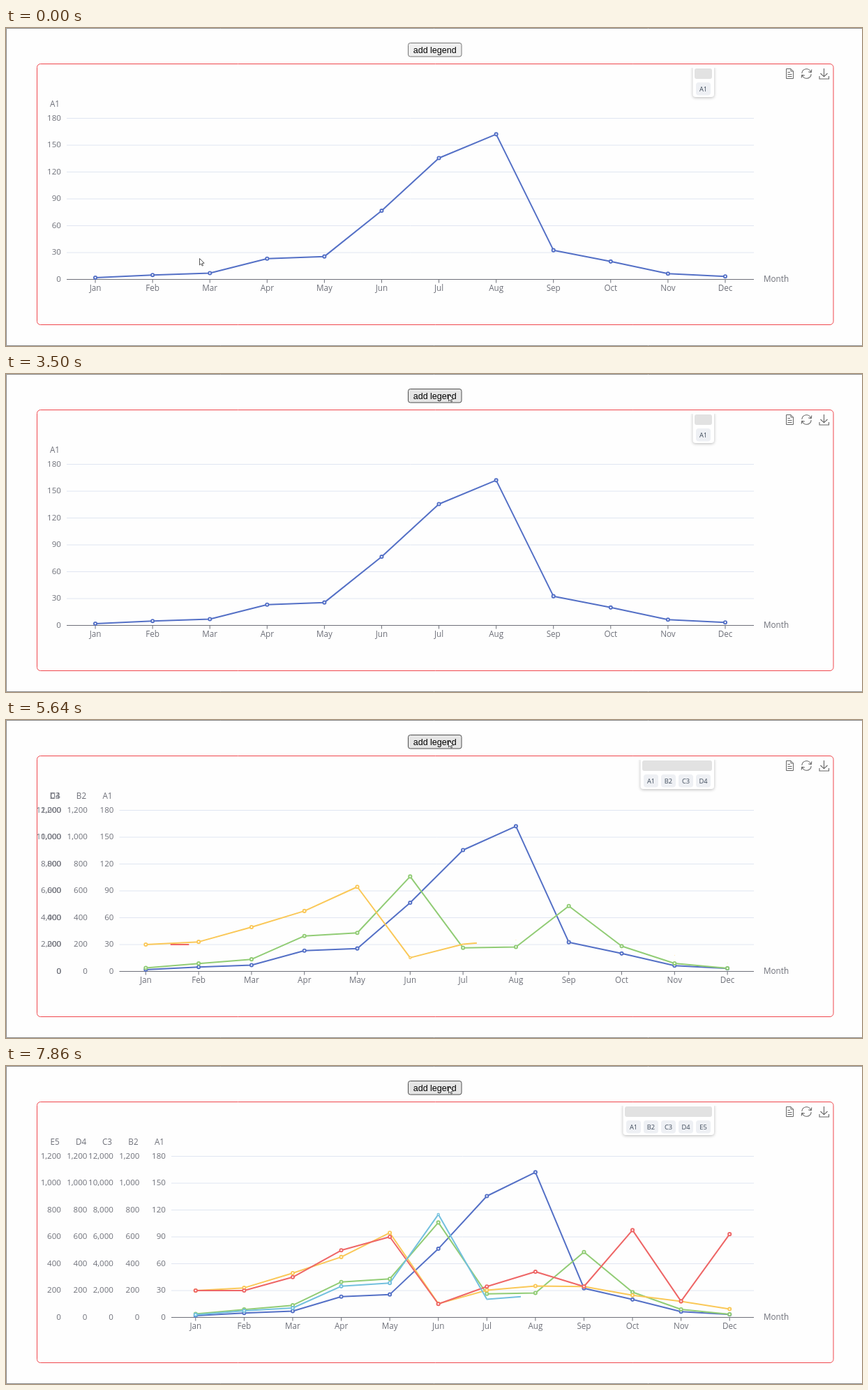
An HTML page with a canvas for the animation above (7990 ms loop, 1227 by 456 pixels).

```html
<!DOCTYPE html>
<html lang="en">
<head>
<meta charset="utf-8">
<title>Add legend</title>
<style>
  html, body { margin: 0; width: 100%; height: 100%; overflow: hidden; background: #fefefe; }
  canvas { display: block; }
</style>
</head>
<body>
<canvas id="stage" width="1227" height="456"></canvas>
<script>
const ctx = document.getElementById('stage').getContext('2d');
const LOOP = 7990, STEP = 132, RESPONSE = 60;
const REVEAL = 1000, MORPH = 500, DOT = 200;
const RIGHT = 1072, BASE = 360.5, HEIGHT = 231;
const GREY = '#6e7079', INK = '#666', FONT = '"Open Sans", "Noto Sans", sans-serif';
const MONTHS = 'Jan Feb Mar Apr May Jun Jul Aug Sep Oct Nov Dec'.split(' ');

const rain = [2, 4.9, 7, 23.2, 25.6, 76.7, 135.6, 162.2, 32.6, 20, 6.4, 3.3];
const series = [
  { name: 'A1', color: '#5470c6', max: 180, click: -5000, data: rain },
  { name: 'B2', color: '#91cc75', max: 1200, click: 3770,
    data: [26, 59, 90, 264, 287, 707, 175.6, 182.2, 487, 188, 60, 23] },
  { name: 'C3', color: '#fac858', max: 12000, click: 4970,
    data: [2, 2.2, 3.3, 4.5, 6.3, 1.02, 2.03, 2.34, 2.3, 1.65, 1.2, .62].map(v => v * 1000) },
  { name: 'D4', color: '#ee6666', max: 1200, click: 5500,
    data: [200, 200, 300, 500, 600, 100, 230, 340, 230, 650, 120, 620] },
  { name: 'E5', color: '#73c0de', max: 1200, click: 7200,
    data: rain.map(v => v > 100 ? v : v * 10) }
];

const pointerPath = [
  { at: 500, x: 277, y: 330 }, { at: 780, x: 351, y: 262 }, { at: 1310, x: 618, y: 309 },
  { at: 1580, x: 1147, y: 136 }, { at: 2420, x: 1147, y: 136 },
  { at: 2920, x: 709, y: 49 }, { at: 3420, x: 634, y: 29 }
];

const clamp = v => Math.min(1, Math.max(0, v));
const mix = (a, b, p) => a + (b - a) * p;
const cubicInOut = p => p < .5 ? 4 * p ** 3 : 1 - 4 * (1 - p) ** 3;
const gridLeft = count => 49.5 + 37.5 * count;
const slotX = (left, i) => left + (RIGHT - left) * (i + .5) / 12;
const startOf = k => k < series.length ? series[k].click + RESPONSE : Infinity;

function frameTime(t) {
  const from = Math.max(0, ...series.map(s => s.click).filter(click => click <= t));
  return from + Math.floor((t - from) / STEP) * STEP;
}

function pointerAt(t) {
  const i = pointerPath.findIndex(p => p.at > t);
  if (i < 1) return i ? pointerPath.at(-1) : pointerPath[0];
  const a = pointerPath[i - 1], b = pointerPath[i], p = (t - a.at) / (b.at - a.at);
  return { x: mix(a.x, b.x, p), y: mix(a.y, b.y, p) };
}

function text(str, x, y, size = 11.7, align = 'center', color = GREY, font = FONT) {
  ctx.font = `${size}px ${font}`;
  ctx.textAlign = align;
  ctx.fillStyle = color;
  ctx.fillText(str, x, y);
}

function paint(path, stroke, width = 1, fill) {
  if (fill) {
    ctx.fillStyle = fill;
    ctx.fill(path);
  }
  if (stroke) {
    ctx.strokeStyle = stroke;
    ctx.lineWidth = width;
    ctx.stroke(path);
  }
}

const shape = (d, ...style) => paint(new Path2D(d), ...style);

function box(x, y, w, h, r, fill, stroke) {
  const path = new Path2D();
  path.roundRect(x, y, w, h, r);
  paint(path, stroke, 1, fill);
}

function drawFrame() {
  ctx.fillStyle = '#fefefe';
  ctx.fillRect(0, 0, 1227, 456);
  shape('M1227 .5H.5V455.5H1227', '#8a8a8a');
  box(44.5, 51.5, 1141.5, 374, 5, null, '#f0474d');
}

function drawButton(t, pointer) {
  const pressed = series.some(s => s.click === t);
  const hover = !pressed && pointer.x < 653 && pointer.y < 41;
  const fill = pressed ? '#f5f5f5' : hover ? '#e5e5e5' : '#efefef';
  box(576.5, 21.5, 76.5, 19.5, 3, fill, hover ? '#4f4f4f' : '#767676');
  text('add legend', 614.7, 35.6, 12.5, 'center', '#000', '"Liberation Sans", Arial, sans-serif');
}

function drawTools() {
  shape('M1125 58.5H1118.5V72.5H1128.5V62L1125 58.5V62H1128.5', INK);
  shape('M1120.5 63.5H1124M1120.5 66.5H1126.5M1120.5 69.5H1126.5', INK);
  for (const turn of [0, Math.PI]) {
    ctx.save();
    ctx.translate(1147.5, 65.5);
    ctx.rotate(turn);
    shape('M-6.7 -.6A6.7 6.7 0 0 1 6.4 -2M7.3 -6L6.7 -1.8L2.8 -2.6', INK, 1.1);
    ctx.restore();
  }
  shape('M1172.5 58V69.5M1167.5 65L1172.5 69.8L1177.5 65M1166 69V73H1179.5V69', INK, 1.1);
}

function drawLegend(count) {
  const width = 25 * count, left = 1012 - width;
  ctx.save();
  ctx.beginPath();
  ctx.rect(left - 15, 57, width + 30, 55);
  ctx.clip();
  ctx.shadowColor = 'rgba(0,0,0,.28)';
  ctx.shadowBlur = 4;
  ctx.shadowOffsetY = 1;
  box(left - 2.5, 54, width + 5.5, 45, 4, '#fff');
  ctx.restore();
  box(left, 58, width, 15, 3, '#e2e2e2');
  for (let i = 0; i < count; i++) {
    const x = left + 12.5 + 25 * i;
    box(x - 10.5, 78, 21, 18.5, 4, '#eef0f4');
    text(series[i].name, x, 90.7, 9.3, 'center', '#3f4b5b');
  }
}

// The newest axis takes the outer place at once while older ones slide right.
function axisX(k, count, left) {
  return k && k === count - 1 ? gridLeft(1) : left - 37.5 * k;
}

function drawAxes(count, left) {
  for (let i = 1; i <= 6; i++) shape(`M${left} ${BASE - HEIGHT * i / 6}H${RIGHT}`, '#e0e6f1');
  for (let k = 0; k < count; k++) {
    const x = axisX(k, count, left), { name, max } = series[k];
    text(name, x - 17, 112.6);
    for (let i = 0; i <= 6; i++)
      text((max * i / 6).toLocaleString('en-US'), x - 8, BASE + 3.2 - HEIGHT * i / 6, 11.6, 'right');
  }
  shape(`M${left} ${BASE}H${RIGHT}`, GREY, 1.2);
  MONTHS.forEach((month, i) => {
    const x = slotX(left, i);
    shape(`M${x} ${BASE}v5`, GREY);
    text(month, x, 376.6);
  });
  text('Month', 1086, 363.6, 11.7, 'left');
}

// Adding another series restarts the remaining part of an unfinished reveal.
function revealRight(k, t) {
  const next = startOf(k + 1);
  const edge = at => mix(gridLeft(k + 1), RIGHT, clamp((at - startOf(k)) / REVEAL));
  return t < next ? edge(t) : mix(edge(next), RIGHT, clamp((t - next) / REVEAL));
}

function drawSeries(k, t, left) {
  const { data, max, color } = series[k];
  const points = data.map((v, i) => [slotX(left, i), BASE - HEIGHT * v / max]);
  ctx.save();
  ctx.beginPath();
  ctx.rect(0, 100, revealRight(k, t), 280);
  ctx.clip();
  ctx.lineJoin = 'bevel';
  shape('M' + points.join('L'), color, 2);
  ctx.restore();

  points.forEach(([x, y], i) => {
    const own = clamp((t - startOf(k) - REVEAL * (i + .5) / 12) / DOT);
    const scale = Math.max(own, clamp((t - startOf(k + 1)) / MORPH));
    if (!scale) return;
    const dot = new Path2D();
    dot.arc(x, y, 2.1 * scale, 0, 7);
    paint(dot, color, 1.9 * scale, '#fff');
  });
}

function drawPointer({ x, y }) {
  ctx.save();
  ctx.translate(x + .5, y + .5);
  shape('M0 0V9.4L2.2 7.5L3.7 10.6L5 10L3.7 6.9L6.6 6.7Z', '#444', .9, '#fff');
  ctx.restore();
}

function render(now) {
  const t = frameTime(now % LOOP), pointer = pointerAt(t);
  const count = series.filter((s, k) => startOf(k) <= t).length;
  const morph = cubicInOut(clamp((t - startOf(count - 1)) / MORPH));
  const left = mix(gridLeft(Math.max(1, count - 1)), gridLeft(count), morph);

  drawFrame();
  drawButton(t, pointer);
  drawTools();
  drawLegend(count);
  drawAxes(count, left);
  for (let k = 0; k < count; k++) drawSeries(k, t, k === count - 1 ? gridLeft(count) : left);
  drawPointer(pointer);
}

const origin = performance.now();
function loop() {
  render(performance.now() - origin);
  requestAnimationFrame(loop);
}
loop();
</script>
</body>
</html>
```
